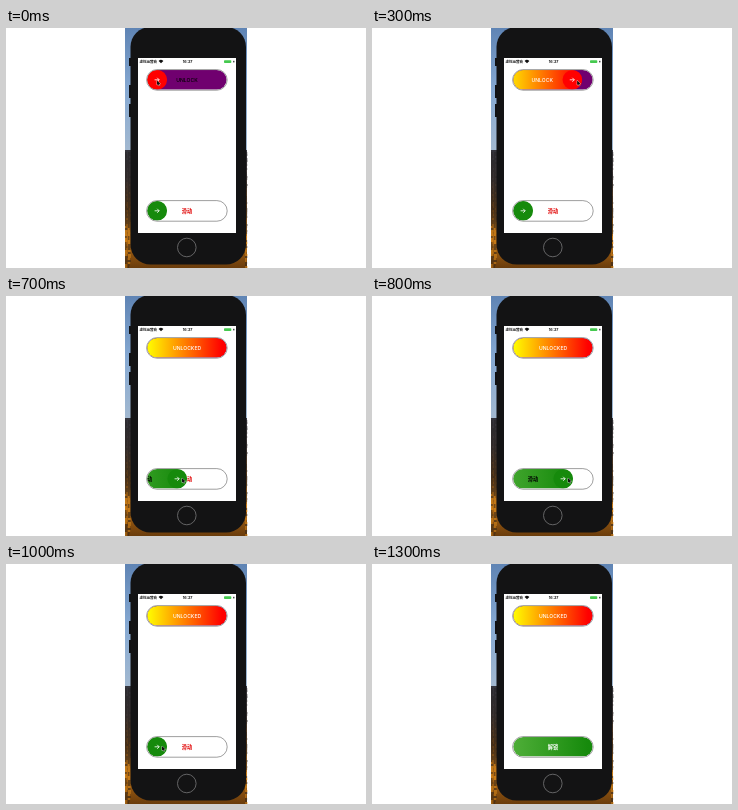
Animation of 360x240 px, one loop 1.4 s. Source, as an HTML page with a canvas:

```html
<!DOCTYPE html>
<html lang="zh">
<head>
<meta charset="utf-8">
<title>Slide to unlock</title>
<style>
html, body { margin: 0; width: 100%; height: 100%; overflow: hidden; background: #fff; }
canvas { display: block; width: 360px; height: 240px; }
</style>
</head>
<body>
<canvas id="stage"></canvas>
<script>
const LOOP = 1400, STEP = 100;
const REST = 161, TRAVEL = 60;
const SANS = 'Inter, "Liberation Sans", sans-serif';
const CJK = '"Noto Sans CJK SC", "Noto Sans CJK", sans-serif';
const canvas = document.getElementById('stage');
const ctx = canvas.getContext('2d');
const dpr = window.devicePixelRatio || 1;
canvas.width = 360 * dpr;
canvas.height = 240 * dpr;
ctx.scale(dpr, dpr);

const mix = (a, b, u) => a + (b - a) * u;

// Smooth 0 to 1 between two times
function ease(from, to, t) {
  const u = Math.min(1, Math.max(0, (t - from) / (to - from)));
  return u * u * (3 - 2 * u);
}

function randomizer(seed) {
  return () => (seed = seed * 16807 % 2147483647) / 2147483647;
}

function pill(x, y, w, h, r = h / 2) {
  ctx.beginPath();
  ctx.roundRect(x, y, w, h, r);
}

function fill(color) {
  ctx.fillStyle = color;
  ctx.fill();
}

function stroke(color, width) {
  ctx.strokeStyle = color;
  ctx.lineWidth = width;
  ctx.stroke();
}

function rect(color, x, y, w, h) {
  ctx.fillStyle = color;
  ctx.fillRect(x, y, w, h);
}

function circle(x, y, r) {
  ctx.beginPath();
  ctx.arc(x, y, r, 0, Math.PI * 2);
}

function gradient(x0, y0, x1, y1, colors) {
  const g = ctx.createLinearGradient(x0, y0, x1, y1);
  colors.forEach((c, i) => g.addColorStop(i / (colors.length - 1), c));
  return g;
}

function label(str, x, y, color, font, align = 'center') {
  ctx.font = font;
  ctx.fillStyle = color;
  ctx.textAlign = align;
  ctx.fillText(str, x, y);
}

function arrow(x, y) {
  ctx.beginPath();
  ctx.moveTo(x - 2.4, y);
  ctx.lineTo(x + 2.2, y);
  ctx.moveTo(x + 0.2, y - 2);
  ctx.lineTo(x + 2.2, y);
  ctx.lineTo(x + 0.2, y + 2);
  stroke('#fff', 0.8);
}

function wallpaper() {
  const rnd = randomizer(17);
  rect(gradient(0, 0, 0, 124, ['#5f84b4', '#86a9d2', '#a3b9d0']), 119, 0, 122, 124);
  rect(gradient(0, 122, 0, 240, ['#34343c', '#3a3230', '#5c3a16', '#b06a14', '#6a3c0c']), 119, 122, 122, 118);
  // Rocks and autumn trees
  for (let y = 124; y < 240; y += 2) {
    const autumn = ease(170, 215, y);
    for (const x of [119, 122, 239]) {
      const glow = rnd() * autumn;
      ctx.globalAlpha = 0.4;
      rect(glow > 0.45 ? '#f09a20' : '#22201f', x, y, 1 + rnd() * 2, 2);
    }
  }
  ctx.globalAlpha = 1;
}

function phone() {
  for (const [y, h] of [[30, 8], [57, 13], [76, 13]]) rect('#101012', 123, y, 2, h);
  pill(124.5, -1, 115.5, 237.5, 20);
  fill('#131314');
  rect('#fff', 132, 30, 98, 175);
  circle(180.8, 219.5, 9.3);
  stroke('#6c6c6e', 0.9);
}

function statusBar() {
  label('虚拟运营商', 133.5, 35, '#222', 'bold 3.5px ' + CJK, 'left');
  ctx.beginPath();
  ctx.moveTo(155, 35.2);
  ctx.arc(155, 35.2, 3.2, -Math.PI * 0.77, -Math.PI * 0.23);
  fill('#111');
  label('16:37', 181.6, 35, '#111', 'bold 3.7px ' + SANS);
  pill(218, 32.2, 7.3, 2.9, 0.8);
  fill('#45c94f');
  rect('#222', 227.2, 32.8, 1.2, 1.6);
}

function slider(s, edge, done) {
  const mid = s.y + 10.8, left = edge - 80;
  pill(140.6, s.y + 0.6, 80.6, 20.6);
  fill('#fff');

  ctx.save();
  pill(141.2, s.y + 1.1, 79.4, 19.4);
  ctx.clip();
  rect(s.track, 140, s.y, 82, 22);
  label(s.text, 181, mid + 2, s.idle, s.font);
  pill(left, s.y + 1, 80, 19.6);
  fill(gradient(left, 0, edge - 5, 0, s.fill));
  if (!done) {
    circle(edge - 10, mid, 9.6);
    fill(s.fill[1]);
    arrow(edge - 10, mid);
  }
  label(done ? s.open : s.text, edge - 40, mid + 2, done ? '#fff' : s.moving, s.font);
  ctx.restore();

  pill(140.6, s.y + 0.6, 80.6, 20.6);
  stroke('#959595', 0.9);
}

function cursor(x, y) {
  ctx.beginPath();
  for (const [dx, dy] of [[0, 0], [0, 4.6], [1.1, 3.7], [1.9, 5.3], [2.7, 4.9], [2, 3.4], [3.4, 3.2]])
    ctx.lineTo(x + dx, y + dy);
  ctx.closePath();
  stroke('#fff', 0.6);
  fill('#111');
}

const upper = {
  y: 41, track: '#70006f', fill: ['#ffff00', '#ff0000'], text: 'UNLOCK', open: 'UNLOCKED',
  idle: '#000', moving: '#fff', font: '500 5.1px ' + SANS
};
const lower = {
  y: 172, track: '#fff', fill: ['#4fae38', '#168a0c'], text: '滑动', open: '解锁',
  idle: '#e00000', moving: '#000', font: 'bold 5.2px ' + CJK
};

const upperEdge = t => REST + TRAVEL * ease(85, 380, t);

// A first try springs back, the second one goes all the way
function lowerEdge(t) {
  const tryOut = ease(600, 800, t) - ease(800, 1000, t);
  return REST + TRAVEL * (tryOut * 2 / 3 + ease(1000, 1300, t));
}

function draw(t) {
  const a = upperEdge(t), b = lowerEdge(t);
  rect('#fff', 0, 0, 360, 240);
  wallpaper();
  phone();
  statusBar();
  slider(upper, a, t >= 400);
  slider(lower, b, t >= 1300);
  if (t >= 1300) return;
  // The pointer holds one knob, then crosses to the other
  const cross = ease(500, 700, t);
  const hold = Math.min(211, a - 10 + 5 * ease(0, 200, t));
  cursor(mix(hold, b - 5, cross), mix(52.5, 182, cross));
}

function tick() {
  const t = performance.now() % LOOP;
  draw(Math.floor(t / STEP) * STEP);
  requestAnimationFrame(tick);
}
tick();
</script>
</body>
</html>
```
